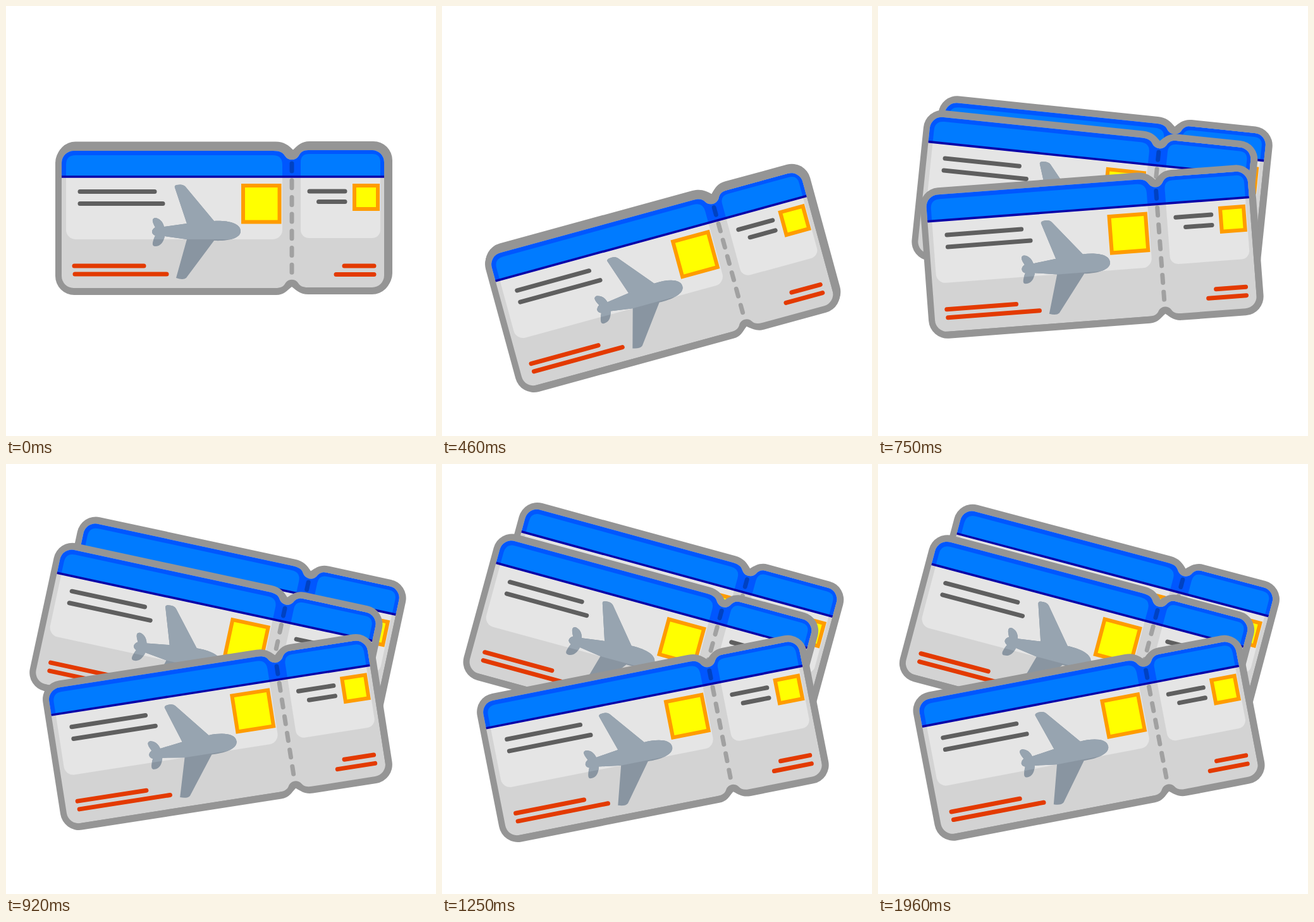
Recreate the animation shown at these times as an HTML page. Size 680 px wide and 680 px high, loop 2000 ms.

```html
<!DOCTYPE html>
<html lang="en">
<head>
<meta charset="utf-8">
<title>Tickets</title>
<style>
  html, body { margin: 0; width: 100%; height: 100%; overflow: hidden; background: #fff; }
  svg { display: block; width: 100vw; height: 100vh; }
</style>
</head>
<body>
<svg viewBox="0 0 680 680">
  <defs>
    <clipPath id="inner">
      <path d="M108 229H422C434 229 438 232 441 237A13 13 0 0 0 463 237C466 231 470 228 478 228H579A19 19 0 0 1 598 247V426A19 19 0 0 1 579 445H477C470 445 465 443 462 438A12 12 0 0 0 442 438C439 444 434 446 426 446H107A19 19 0 0 1 88 427V248A19 19 0 0 1 108 229Z"/>
    </clipPath>
    <clipPath id="upper"><path d="M95 236H437V369H95Z"/></clipPath>
    <path id="plane" d="M371 356C371 368 350 372 329 371L285 430Q280 434 269 430L286 369L251 364C249 374 244 380 236 380C230 380 231 374 236 363Q231 361 231 357Q231 353 236 350C231 341 230 336 236 335C243 336 248 341 250 349L286 344L267 287Q266 284 270 283Q280 281 284 286L329 340C350 339 371 343 371 356Z"/>
    <g id="ticket" fill="none" stroke-linecap="round" stroke-width="7">
      <path fill="#959595" d="M108 218H424C438 218 445 224 452 231C459 224 465 217.5 478 217.5H579A30 30 0 0 1 609 247.5V426A30 30 0 0 1 579 456H478C465 456 460 450 452 444C444 450 440 457 427 457H108A30 30 0 0 1 78 427V248A30 30 0 0 1 108 218Z"/>
      <g clip-path="url(#inner)">
        <path fill="#d3d3d3" d="M80 220H610V450H80Z"/>
        <g fill="#e5e5e5">
          <rect x="95" y="236" width="342" height="133" rx="15"/>
          <rect x="466" y="234" width="126" height="133" rx="13"/>
        </g>
        <path fill="#0057ff" d="M80 220H610V270H80Z"/>
        <path fill="#007bff" d="M95 270V251Q95 236 110 236H422Q437 236 437 251V270ZM466 270V247Q466 234 479 234H579Q592 234 592 247V270Z"/>
        <path stroke="#0a00a8" stroke-width="3.6" d="M80 270H610"/>
      </g>
      <path stroke="#000" stroke-opacity=".24" stroke-dasharray="12 14.7" d="M452 249V422"/>
      <path stroke="#5f5f5f" d="M117 293.5H235M117 312.5H248M480 293H536M494.5 309.5H536"/>
      <path stroke="#e33a00" d="M108 411H218M109 424H254M535 411H582M522 424.5H582"/>
      <g fill="#ff0" stroke="#ff9c00" stroke-width="6" stroke-linecap="butt">
        <rect x="375" y="284" width="57.5" height="57.5"/>
        <rect x="551" y="284" width="37" height="37"/>
      </g>
      <use href="#plane" fill="#8995a1"/>
      <use href="#plane" fill="#97a4b0" clip-path="url(#upper)"/>
    </g>
  </defs>
  <use class="card" href="#ticket"/>
  <use class="card" href="#ticket"/>
  <use class="card" href="#ticket"/>
</svg>
<script>
  const LOOP = 2000, FPS = 24, SPREAD = 570;
  const cards = document.querySelectorAll('.card');

  // Resting fan, back to front: angle, offset, and how far the shift leads the turn
  const fan = [
    { angle: 15.65, x: 11.5, y: -99, lead: 0.55 },
    { angle: 15.65, x: -28.8, y: -48.6, lead: 0.9 },
    { angle: -11.42, x: -10.5, y: 98, lead: 0.62 }
  ];
  const dip = { angle: -19.5, x: 5.8, y: 115, lead: 0.25 };

  // Overshoot and settling of the fan: [time, openness]
  const sway = [[1112, 1.11], [1320, 0.93], [1620, 1.012], [2000, 0.947]];

  function openness(t) {
    const [peakTime, peak] = sway[0];
    if (t < peakTime) {
      const p = (t - SPREAD) / (peakTime - SPREAD);
      return peak * (p + p ** 4 * (1 - p));
    }
    const i = sway.findIndex(key => t < key[0]);
    const [t0, a] = sway[i - 1], [t1, b] = sway[i];
    return a + (b - a) * (1 - Math.cos(Math.PI * (t - t0) / (t1 - t0))) / 2;
  }

  function draw(now) {
    const frame = Math.floor((now % LOOP) * FPS / 1000 + 0.1) % (LOOP * FPS / 1000);
    const t = frame * 1000 / FPS;
    const stacked = t < SPREAD;
    const turn = stacked ? Math.sin(Math.PI * (t / SPREAD) ** 1.55) : openness(t);
    cards.forEach((card, i) => {
      const pose = stacked ? dip : fan[i];
      const shift = turn + pose.lead * turn * (1 - turn);
      // In the stack, cards behind peek out at the top right
      const peek = (2 - i) * (stacked ? 1 : 1 - shift);
      card.setAttribute('transform',
        `translate(${pose.x * shift} ${pose.y * shift}) ` +
        `rotate(${pose.angle * turn} 344 335.5) translate(${peek} ${-1.8 * peek})`);
    });
  }

  const start = performance.now();
  function tick() {
    draw(performance.now() - start);
    requestAnimationFrame(tick);
  }
  tick();
</script>
</body>
</html>
```
